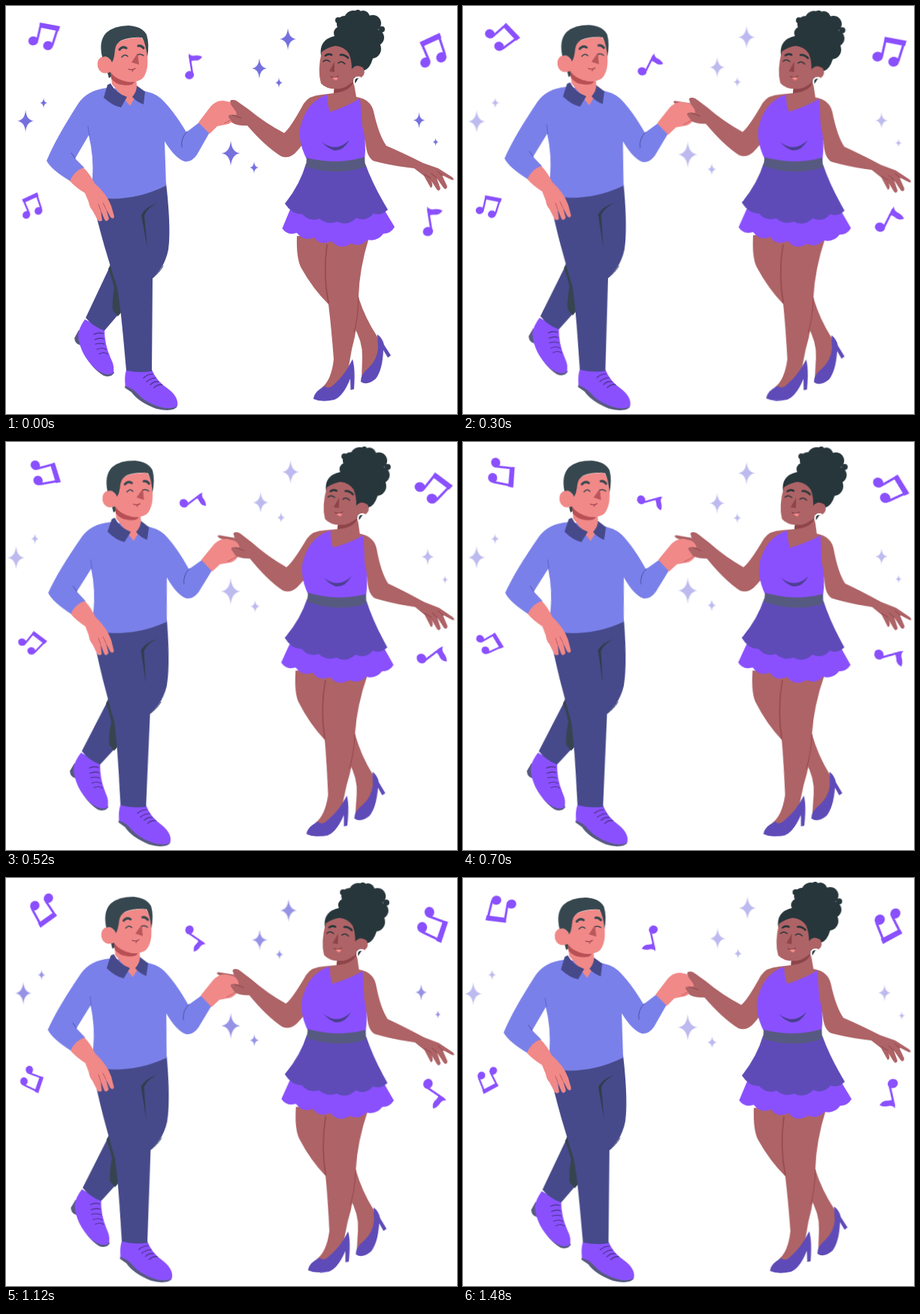
Animation, 600 px wide and 543 px high, one loop 1510 ms. Source, as an HTML page:

```html
<!DOCTYPE html>
<html lang="en">
<head>
<meta charset="utf-8">
<title>Dancing couple</title>
<style>
  html, body { margin: 0; width: 100%; height: 100%; overflow: hidden; background: #fff; }
  svg { display: block; width: 100vw; height: 100vh; }
  .sway, .stars, .spin { animation: 1510ms linear infinite; }
  .man { transform-origin: 205px 265px; animation-name: sway; }
  .woman { transform-origin: 440px 255px; animation-name: sway; }
  .stars { transform-origin: 300px 134px; animation-name: drift, fade; fill: #7570de; }
  .spin { animation-name: spin; }
  .note { fill: #8a50fe; stroke: none; }
  .note .stem { fill: none; stroke: #8a50fe; stroke-width: 3; }
  .skin { fill: #f08988; }
  .brown { fill: #ae6366; }
  .hair { fill: #37474f; }
  .curl { fill: #27363b; }
  .knit { fill: #7a80e9; }
  .navy { fill: #464a8a; }
  .violet { fill: #8a50fe; }
  .plum { fill: #5f4bb8; }
  .slate { fill: #575a80; }
  .line { fill: none; stroke-linecap: round; stroke-linejoin: round; stroke: #37474f; stroke-width: 1.5; }
  @keyframes sway {
    0%, 100% { transform: rotate(0deg); }
    33.3%, 66.6% { transform: rotate(2deg); }
  }
  @keyframes drift {
    0%, 66.6% { transform: scale(1); }
    33.3%, 100% { transform: scale(1.048); }
  }
  @keyframes fade {
    0%, 66.6% { opacity: 1; }
    18%, 47%, 83%, 100% { opacity: .48; }
  }
  @keyframes spin { to { transform: rotate(180deg); } }
</style>
</head>
<body>
<svg viewBox="0 0 600 543" preserveAspectRatio="none">
  <defs>
    <path id="star" d="M0-15Q1-1.2 11 0Q1 1.2 0 15Q-1 1.2-11 0Q-1-1.2 0-15Z"/>
    <g id="pair" class="note">
      <ellipse cx="-14.3" cy="5.4" rx="6.6" ry="6" transform="rotate(-10 -14 5)"/>
      <ellipse cx="5.5" cy="11.8" rx="6.6" ry="6" transform="rotate(-10 5 12)"/>
      <path class="stem" d="M-9 5L-4-17M11 11.500L18.500-12"/>
      <path d="M-5.500-19L21.500-14L19.500-7.500L-6-12.500Z"/>
    </g>
    <g id="single" class="note">
      <ellipse cx="-5" cy="11.500" rx="6" ry="5.400" transform="rotate(-15 -5 11)"/>
      <path class="stem" d="M-.8 11L-5-15" style="stroke-width:2.500"/>
      <path d="M-6-17.500Q-3-13.500 2-14.500Q8-15.500 12-13Q9-8 4-8Q-2-8.500-4.500-6Z"/>
    </g>
  </defs>

  <g class="stars">
    <use href="#star" transform="translate(26 153)"/>
    <use href="#star" transform="translate(50 129) scale(.45)"/>
    <use href="#star" transform="translate(375 44)"/>
    <use href="#star" transform="translate(337 83) scale(.9)"/>
    <use href="#star" transform="translate(363 102) scale(.45)"/>
    <use href="#star" transform="translate(299 196) scale(1.15)"/>
    <use href="#star" transform="translate(330 215) scale(.53)"/>
    <use href="#star" transform="translate(549.500 152) scale(.7)"/>
    <use href="#star" transform="translate(571.500 181) scale(.36)"/>
  </g>

  <g transform="translate(50.500 41)"><g class="spin"><use href="#pair"/></g></g>
  <g transform="translate(567 61.500)"><g class="spin"><use href="#pair" transform="rotate(-36) scale(1.08)"/></g></g>
  <g transform="translate(34 267.500)"><g class="spin"><use href="#pair" transform="rotate(-36) scale(.82)"/></g></g>
  <g transform="translate(249 80.500)"><g class="spin"><use href="#single"/></g></g>
  <g transform="translate(567 287)"><g class="spin"><use href="#single" transform="scale(1.14)"/></g></g>

  <g class="sway woman">
    <!-- legs and shoes -->
    <path class="brown" d="M387 306Q386 337 393 349Q408 376 429 397L461 424Q475 446 474 468L473 498Q490 492 496 462Q497 448 494 440Q478 416 469 388L445 308Z"/>
    <path class="plum" d="M494 437Q501 442 503 451L512 465L508 468L502 458Q501 484 492 496Q480 506 472 500Q471 491 483 481Q494 470 495 455Z"/>
    <path class="brown" d="M427 314L483 308Q470 350 469 387Q469 425 460 457L456 480Q447 502 428 510L420 508Q433 498 436 470Q433 430 429 397Q419 358 427 314Z"/>
    <path class="line" d="M427 318Q421.500 358 429 395" style="stroke:#95474b;stroke-width:1.500"/>
    <path class="line" d="M469 388Q468 418 463 434" style="stroke:#95474b;stroke-width:1"/>
    <path class="plum" d="M461 470Q465 482 463 510L458.500 511L458 496Q449 519 437 524Q420 528 409 523Q410 513 424 506Q430 511 437 503Q451 491 461 470Z"/>
    <!-- arms and chest -->
    <path class="brown" d="M437 100L436 116L420 118Q403 119 396 130Q378 163 370 169Q345 156 322 137L306 126Q298 123 298 128L304 133L279 129.500Q275 131 281 134L306 144L298 153Q306 160 320 158Q345 187 366 200Q378 205 389 191L410 165L470 160L478 180Q480 205 492 207Q515 213 543 216L556 226L565 242Q569 241 566 233L573 244Q576 248 578 243L573 229L582 242Q586 246 587 240L580 225L592 231Q598 233 594 228L575 216L555 209Q525 194 506 186Q496 172 489 140Q485 124 466 121L462 98Z"/>
    <path d="M437 109Q452 109 463 100Q458 114 436 116Z" fill="#8d4549"/>
    <path class="line" d="M556 224L565 229M566 223L573 229M574 220L581 226" style="stroke:#8d4549;stroke-width:1"/>
    <!-- dress -->
    <path class="violet" d="M380 266L367.500 296Q374 306 387 302Q396 314 410 308Q418 320 433 313Q445 326 459 316Q471 322 481 311Q494 314 502 303Q512 303 517 294L500 266Z"/>
    <path class="violet" d="M427 118Q402 127 394 153Q385 175 401 206Q440 218 477 206Q480 178 474 160L471 123Q455 133 431 141Q427 130 427 118Z"/>
    <path class="plum" d="M399 210L478 210Q488 238 508 271Q499 280 489 276Q479 288 466 282Q454 294 441 287Q428 292 417 283Q404 288 394 277Q381 278 371 263Q391 238 399 210Z"/>
    <path class="slate" d="M400 202Q440 212 477 201L478 214Q440 227 399 214Z"/>
    <path d="M420 181Q440 196 457 178Q442 205 420 181Z" fill="#4b3f92"/>
    <!-- head -->
    <g class="curl">
      <path d="M419 66Q416 45 437 40Q462 33 480 50L488 70Q484 84 476 86L470 94L464 104L456 90Z"/>
      <circle cx="451" cy="24" r="11"/><circle cx="462" cy="18" r="12"/>
      <circle cx="475" cy="15" r="9"/><circle cx="488" cy="23" r="11"/>
      <circle cx="492" cy="42" r="11"/><circle cx="486" cy="57" r="13"/>
      <circle cx="468" cy="43" r="25"/><circle cx="445" cy="36" r="9"/>
      <circle cx="468" cy="9" r="4"/><circle cx="500" cy="31" r="4"/>
      <circle cx="442" cy="19" r="4"/>
    </g>
    <path class="brown" d="M420 61Q428 55 438 53Q450 54 456 63Q460 72 460 84Q466 76 475 82Q480 91 471 96Q466 97 464 94Q460 106 445 110Q427 112 419 103Q414 86 420 61Z"/>
    <g class="line" style="stroke:#27363b">
      <path d="M425 66Q429 63 433 65M445 65Q450 64 455 69" style="stroke-width:2.800"/>
      <path d="M422 74Q426 70 431 74M442 76Q446 72 451 77"/>
    </g>
    <path d="M437 74L430 87L437 88Z" fill="#8d4549"/>
    <path class="line" d="M432 94Q437 97 442 93" style="stroke:#6d3038;stroke-width:1"/>
    <path d="M434 96Q438 94 441 95Q442 99 438 99Z" fill="#f08988"/>
    <path class="line" d="M471 95Q463 94 463 100Q463 105 467 107" style="stroke:#fff;stroke-width:2.200"/>
  </g>

  <g class="sway man">
    <!-- shoes -->
    <path class="slate" d="M97 431L91 442Q92 450 98 451L101 454Q110 480 130 492Q140 495 144 488L135 470Z"/>
    <path class="violet" d="M105 417Q97 428 96 438C97 455 106 471 119 483Q132 493 142 489Q146 482 139 468Q131 450 131 431Z"/>
    <path class="slate" d="M159 503L158 508L167 514Q176 527 200 536Q222 541 228 533L210 520Z"/>
    <path class="violet" d="M160 484L194 484Q200 499 215 509Q230 520 228 532Q220 538 203 533Q185 527 176 517Q168 508 159 506Q157 495 160 484Z"/>
    <path class="line" d="M117 437Q123 434 129 436M118 444Q125 441 130 443M119 450Q126 448 131 450M121 457Q128 454 133 457M124 463Q130 460 135 463M183 495Q188 490 195 490M187 500Q193 495 199 495M192 504Q197 499 203 500M197 508Q202 503 208 504" style="stroke:#44327e;stroke-width:1.200"/>
    <!-- trousers -->
    <path class="navy" d="M139 345L106 415Q116 427 131 432L155 404L156 360Z"/>
    <path d="M136 350L139 344L149 372L153 408L149 413L142 405Q141 390 144 375Q141 362 136 350Z" fill="#36444f"/>
    <path class="navy" d="M114 252L213 236C217 270 219 305 216 324C212 345 201 357 195 362L194 486Q177 489 160 485C156 440 153 405 148 375C137 340 124 300 114 252Z"/>
    <path d="M202 262Q188 268 184 279L188 322L180 278Q186 267 202 262Z" fill="#303d4c"/>
    <path class="line" d="M195 362Q204 355 209 346" style="stroke:#36406a;stroke-width:1"/>
    <!-- jumper -->
    <path class="knit" d="M134 109Q108 112 96 130C78 158 62 186 54 206Q60 218 87 234L104 215L92 203L110 172Q117 200 115 230L114 254Q165 263 213 239L211 180Q225 203 238 207Q247 208 254 198L271 168L257 155L240 168Q222 138 206 123Q196 114 176 112Z"/>
    <path class="line" d="M241 167Q232 176 234 188M92 203L87 196" style="stroke:#4a50a8;stroke-width:1"/>
    <path class="line" d="M111 172L109 160" style="stroke:#5c62c8;stroke-width:1"/>
    <!-- hands -->
    <path class="skin" d="M85 233Q90 220 103 215Q112 224 118 236Q134 250 140 266L144 280Q143 285 139 281L133 270L137 283Q134 289 131 284L126 272L128 285Q125 288 122 285L115 272Q111 268 110 261L105 249Q92 241 85 233Z"/>
    <path class="line" d="M126 272L123 264M133 270L129 262" style="stroke:#c05a60;stroke-width:1"/>
    <path class="skin" d="M256 155L272 134Q280 125 289 126L299 128Q306 131 306 138Q309 150 296 157L281 160L271 170Z"/>
    <path class="line" d="M306 146Q298 153 291 156" style="stroke:#c05a60;stroke-width:1"/>
    <!-- head -->
    <path class="hair" d="M133 82L137 96L143 92L141 75Z"/>
    <path class="skin" d="M139 84L141 104L165 133L175 116L173 96Z"/>
    <path d="M139 88Q150 101 171 101Q168 107 155 105Q146 104 140 97Z" fill="#b85055"/>
    <path class="skin" d="M140 58Q148 42 180 42Q187 50 188 66Q190 88 181 97Q174 102 162 101Q146 98 139 88Q126 93 122 81Q120 70 129 67Q136 66 140 73Z"/>
    <path class="hair" d="M128 68Q123 47 133 36Q144 26 163 26Q181 27 187 38Q191 51 188 68Q186 50 181 42Q166 41 153 46Q146 50 145 58Q144 71 141 75Q136 65 128 68Z"/>
    <g class="line">
      <path d="M151 58Q155 53 160 56M176 53Q180 52 183 56" style="stroke-width:3.200"/>
      <path d="M154 68Q158 63 162 67M175 65Q179 63 183 66"/>
    </g>
    <path d="M175 63L167 75L177 78Z" fill="#b9575c"/>
    <path class="line" d="M163 84Q168 86 172 83M169 85L168 87" style="stroke:#983f48;stroke-width:1.100"/>
    <!-- collar -->
    <path class="navy" d="M135 105L130 122Q142 133 153 135L161 121Q146 116 139 103Z"/>
    <path class="navy" d="M174 106L185 114L183 131Q173 127 168 121Q174 114 174 106Z"/>
  </g>

  <g class="sway woman">
    <path class="brown" d="M299 126Q303 123 309 128L327 142L322 159Q311 160 302 156L296 148Q295 144 302 145L309 145L299 131Z"/>
    <path class="line" d="M301 145L313 149" style="stroke:#8d4549;stroke-width:1"/>
  </g>
</svg>
</body>
</html>
```
